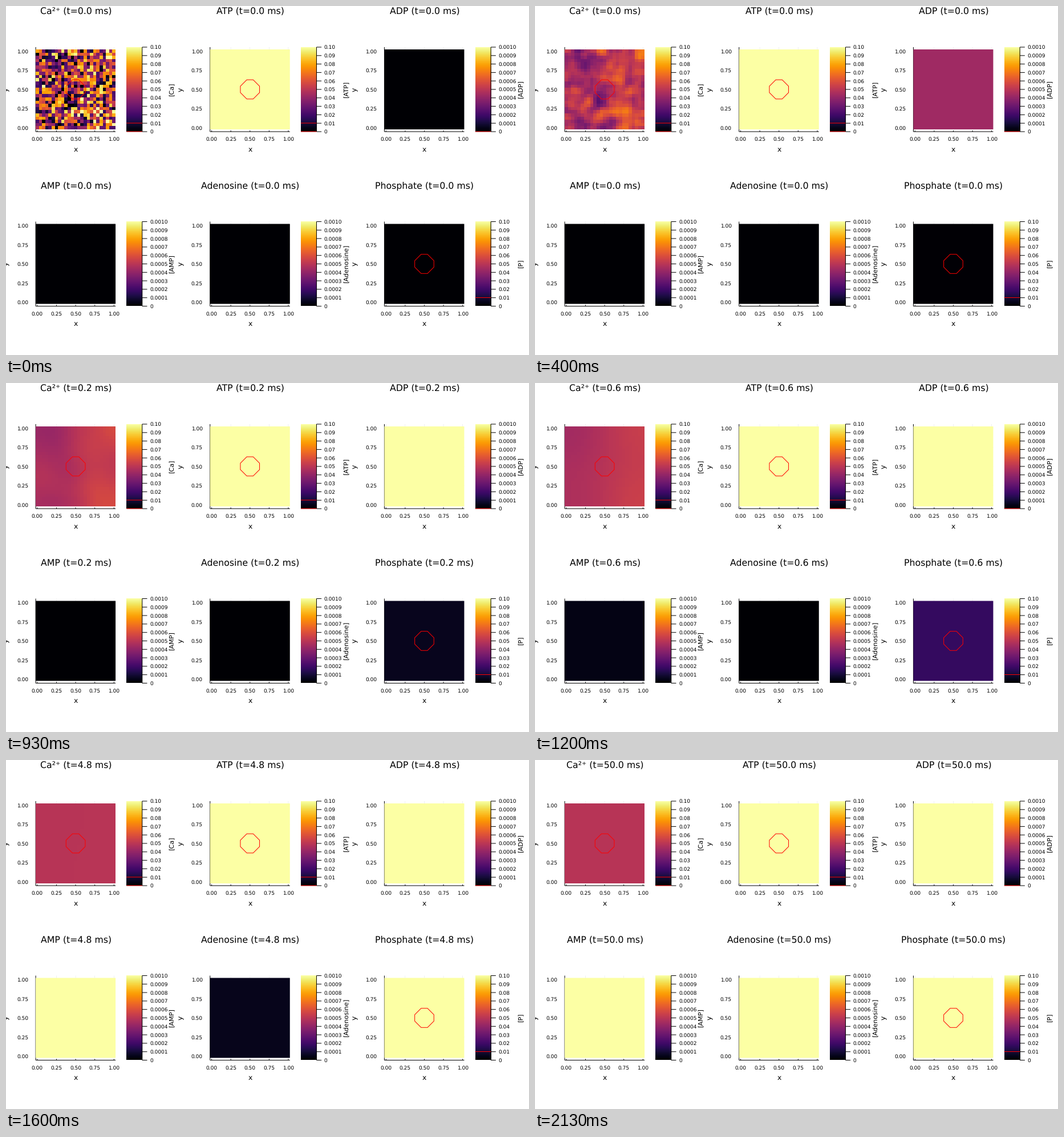
Write a matplotlib script that moves like this. It is 917 px wide and 611 px high and loops after 2.19 s.

```python
import numpy as np
import matplotlib.pyplot as plt
from matplotlib.animation import FuncAnimation
from matplotlib.patches import Polygon, Rectangle

W, H, DPI = 917, 611, 100
LOOP, STEPS = 2190, 33
N = 25                       # cells per side
CX, CY = 122.1, 146          # plot centre inside a panel
HALF, AXIS = 70, 74          # half heatmap, half axis height
CELL = 2 * HALF / N
BAR = (211.3, 238.8)
CMAP = plt.get_cmap("inferno")

plt.rcParams.update({"font.family": "DejaVu Sans", "path.snap": False,
                     "text.hinting": "none"})
fig = plt.figure(figsize=(W / DPI, H / DPI), dpi=DPI, facecolor="white")
ax = fig.add_axes([0, 0, 1, 1])
ax.axis("off")


def px(n):
    return n * 72 / DPI


def text(x, y, s, size, **kw):
    return ax.text(x, y, s, fontsize=px(size), **{"va": "baseline", **kw})


def line(xs, ys, color="black", width=1, **kw):
    ax.plot(xs, ys, color=color, lw=px(width), solid_capstyle="butt", **kw)


def image(data, x0, x1, y0, y1, z):
    return ax.imshow(data, cmap=CMAP, vmin=0, vmax=1, extent=(x0, x1, y1, y0),
                     aspect="auto", interpolation="nearest", zorder=z)


# --- solver time: piecewise exponential growth of the step
KNOTS = [1, 6, 14, 18, 21, 27, 32]
TIMES = [0.001, 0.0143, 0.17, 0.57, 1.62, 14.1, 50]


def sim_time(i):
    return 0 if i == 0 else float(np.exp(np.interp(i, KNOTS, np.log(TIMES))))


# --- calcium: noise that diffuses, solved in cosine modes
k = np.arange(N)
BASIS = np.cos(np.pi * np.outer(k, k + 0.5) / N) * np.sqrt(2 / N)
BASIS[0] /= np.sqrt(2)
LAM = 2 * (1 - np.cos(np.pi * k / N)) * N ** 2
DECAY = 0.08 * (LAM[:, None] + LAM[None, :])
BUMPS = [(.68, .70, .20), (.05, .50, .15), (.75, .22, .18), (.95, .92, .12),
         (.55, .22, .12), (.90, .10, .08), (.03, .78, -.16), (.30, .78, -.20),
         (.50, .48, -.12), (.42, .30, -.12), (.30, .05, -.12),
         (.65, .02, -.10), (.95, .52, -.14)]


def initial_modes():
    noise = np.random.default_rng(7).random((N, N))
    modes = BASIS @ noise @ BASIS.T
    modes[:4, :4] = 0
    x, y = np.meshgrid((k + 0.5) / N, (k + 0.5) / N)
    shape = -0.035 * np.cos(np.pi * x) + 0.006 * np.cos(np.pi * y)
    for bx, by, a in BUMPS:
        shape += a * np.exp(-((x - bx) ** 2 + (y - by) ** 2) / (2 * 0.07 ** 2))
    modes += BASIS @ shape @ BASIS.T
    modes[0, 0] = 0.492 * N
    return modes


MODES = initial_modes()


def calcium(t):
    return np.clip(BASIS.T @ (MODES * np.exp(-DECAY * t)) @ BASIS, 0, 1)


# name, bar label, bar digits, octagon, level relative to the bar's top
PANELS = [
    ("Ca²⁺", "Ca", 2, True, None),
    ("ATP", "ATP", 2, True, lambda t: 1),
    ("ADP", "ADP", 4, False, lambda t: 30 * t),
    ("AMP", "AMP", 4, False, lambda t: 0.12 * t ** 2),
    ("Adenosine", "Adenosine", 4, False, lambda t: 0.42 * (t / 14.1) ** 2),
    ("Phosphate", "P", 2, True, lambda t: 0.3 * t),
]


def axes_frame(ox, oy):
    cx, cy = ox + CX, oy + CY
    left, bottom = cx - HALF, cy + AXIS
    for j in range(5):
        d = (j / 4 - 0.5) * (N - 1) * CELL
        line([cx + d] * 2, [cy - AXIS, bottom], alpha=0.1, width=0.6, zorder=1)
        line([left, cx + HALF], [cy - d] * 2, alpha=0.1, width=0.6, zorder=1)
        line([cx + d] * 2, [bottom - 2, bottom], zorder=2)
        label = f"{j / 4:.2f}"
        text(cx + d, oy + 236.1, label, 9, ha="center")
        text(ox + 39, cy - d + 3.6, label, 9, ha="right")
    line([left, left], [cy - AXIS, bottom], zorder=2)
    line([left, cx + HALF], [bottom, bottom], zorder=2)
    text(cx + 0.3, oy + 254.6, "x", 12.4, ha="center")
    text(ox + 0.8, cy, "y", 12.4, ha="center", va="center", rotation=90)


def colorbar(ox, oy, label, digits, marked):
    x0, x1 = ox + BAR[0], ox + BAR[1]
    top, bottom = oy + CY - AXIS, oy + CY + AXIS
    image(np.linspace(1, 0, 256)[:, None], x0, x1, top, bottom, 3)
    line([x1, x1], [top, bottom], zorder=4)
    for j in range(11):
        y = bottom - j * 2 * AXIS / 10
        line([x1, x1 + 8.7], [y, y], zorder=4)
        text(ox + 252, y + 3.3, f"{j / 10 ** digits:.{digits}f}" if j else "0", 9)
    if marked:
        y = bottom - 2 * AXIS / 10 + 0.0
        line([x0, x1], [y - 0.2, y - 0.2], "red", zorder=5)
    if oy == 0:
        line([x0, x1], [bottom, bottom], "red", zorder=5)
    text(ox + 291, oy + CY, f"[{label}]", 11.25, ha="center", va="center",
         rotation=90)


def octagon(cx, cy):
    pts = [(3, 1), (1, 3), (-1, 3), (-3, 1), (-3, -1), (-1, -3), (1, -3), (3, -1)]
    ax.add_patch(Polygon([(cx + CELL * u, cy + CELL * v) for u, v in pts],
                         fill=False, ec="red", lw=px(1), zorder=6))


titles, fields = [], []
for n, (name, label, digits, marked, level) in enumerate(PANELS):
    ox, oy = (n % 3) * W / 3, (n // 3) * H / 2
    cx, cy = ox + CX, oy + CY
    axes_frame(ox, oy)
    colorbar(ox, oy, label, digits, marked)
    if level is None:
        field = image(np.zeros((N, N)), cx - HALF, cx + HALF,
                      cy - HALF, cy + HALF, 3)
    else:
        field = ax.add_patch(Rectangle((cx - HALF, cy - HALF), 2 * HALF,
                                       2 * HALF, lw=0, zorder=3))
    if marked:
        octagon(cx, cy)
    fields.append(field)
    titles.append(text(cx + 0.5, oy + 14, "", 15.75, ha="center"))

ax.set_xlim(0, W)
ax.set_ylim(H, 0)


def update(i):
    t = sim_time(i)
    for (name, _, _, _, level), title, field in zip(PANELS, titles, fields):
        title.set_text(f"{name} (t={t:.1f} ms)")
        if level is None:
            field.set_data(calcium(t)[::-1])
        else:
            field.set_facecolor(CMAP(min(1.0, float(level(t)))))
    return titles + fields


anim = FuncAnimation(fig, update, frames=STEPS, interval=LOOP / STEPS,
                     repeat=True, blit=False)
plt.show()
```
